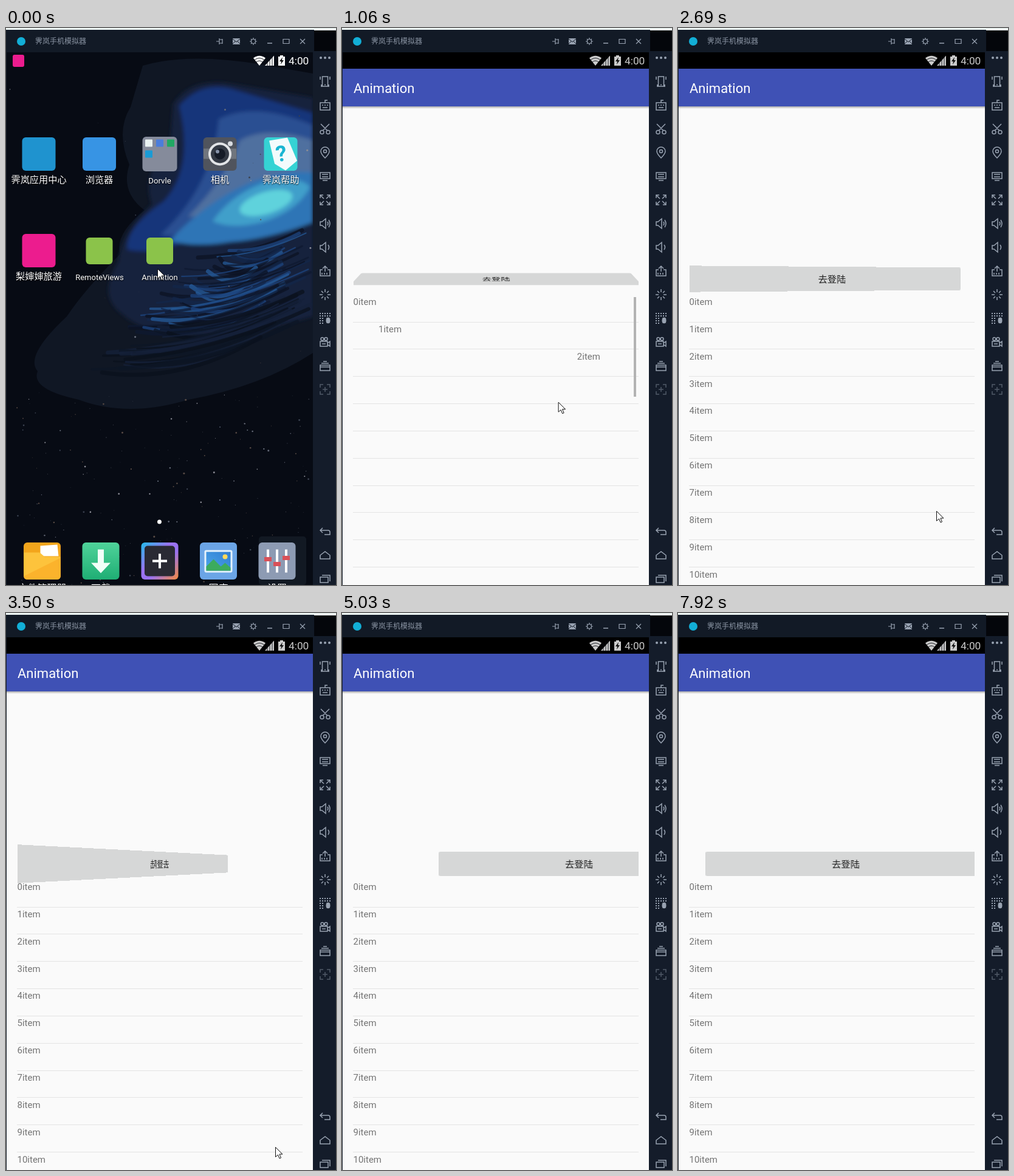
Animation of 543 by 917 pixels, one loop 8000 ms. Source, as an HTML page:

```html
<!DOCTYPE html>
<html lang="zh">
<head>
<meta charset="utf-8">
<title>Animation</title>
<style>
html, body { margin: 0; width: 100%; height: 100%; overflow: hidden; background: #070b14; }
#stage { position: relative; width: 543px; height: 917px; overflow: hidden; }
svg, #app, #content { position: absolute; left: 0; top: 0; width: 543px; height: 917px; overflow: visible; }
text { font-family: Roboto, "Noto Sans CJK SC", "Noto Sans CJK", sans-serif; }
#app { transform-origin: 253px 478px; }
#clip { position: absolute; left: 18.5px; top: 129px; width: 469px; height: 788px; overflow: hidden; }
#button {
  position: absolute; left: 4px; top: 264px; width: 461px; height: 40px;
  border-radius: 2px; background: #d6d7d7; color: #1c1c1c; text-align: center;
  font: 15.3px/39px "Noto Sans CJK SC", "Noto Sans CJK", sans-serif;
}
.label { fill: #fff; text-anchor: middle; text-shadow: 0 1px 2px #000; }
.line { fill: none; stroke: #98a2b1; stroke-width: 1.5; }
</style>
</head>
<body>
<div id="stage">
  <svg viewBox="0 0 543 917">
    <defs>
      <filter id="soft" x="-20%" y="-20%" width="140%" height="140%"><feGaussianBlur stdDeviation="3"/></filter>
      <linearGradient id="sky" x1="0" y1="1" x2="1" y2="0">
        <stop offset="0" stop-color="#4da5ea"/><stop offset="1" stop-color="#2f7fd3"/>
      </linearGradient>
      <linearGradient id="mint" x2="0" y2="1">
        <stop offset="0" stop-color="#4fd39a"/><stop offset="1" stop-color="#1fae74"/>
      </linearGradient>
      <linearGradient id="rainbow" x2="1" y2="1">
        <stop offset="0" stop-color="#21bdea"/><stop offset=".4" stop-color="#9a72f0"/>
        <stop offset=".6" stop-color="#9a72f0"/><stop offset="1" stop-color="#f58a3c"/>
      </linearGradient>
    </defs>
    <rect width="543" height="917" fill="#070b14"/>
    <path fill="#101724" d="M225 62Q300 40 420 60L505 75V535Q420 590 300 612Q200 642 120 612Q40 595 52 565Q30 540 100 475Q130 430 188 372Q178 340 228 300Q188 270 203 225Q180 170 205 130Z"/>
    <g filter="url(#soft)">
      <path fill="#13203c" d="M275 125Q300 85 360 90L505 115V475Q420 500 330 505Q230 508 190 470Q150 440 185 385Q190 335 240 290Q222 240 270 190Z"/>
      <path fill="#18347a" d="M285 128Q320 88 370 100L505 140V270L370 300Q280 380 200 365Q195 330 260 285Q310 230 285 128Z"/>
      <path fill="#2a4f92" d="M350 150Q410 120 505 160V250Q400 250 350 300Q290 350 255 340Q340 260 350 150Z"/>
      <path fill="#506f9f" d="M385 185Q430 160 505 185V245Q420 235 360 282Q320 315 300 310Q360 250 385 185Z"/>
      <path fill="#2f74b6" d="M270 350Q330 285 400 255Q460 232 505 238V320Q430 348 370 352Q310 362 270 350Z"/>
      <path fill="#419fca" d="M340 318Q375 268 440 250Q490 246 500 262Q480 302 420 320Q370 332 340 318Z"/>
      <ellipse cx="428" cy="288" rx="45" ry="18" fill="#5fd2dc" transform="rotate(-17 428 288)"/>
    </g>
    <g id="streaks" fill="none" stroke-linecap="round"></g>
    <g id="stars"></g>
    <rect x="416" y="837" width="78" height="80" rx="5" fill="#121923"/>
    <g id="home"></g>
  </svg>

  <div id="app">
    <svg viewBox="0 0 543 917"><rect x="1" y="67" width="504" height="950" fill="#fafafa"/></svg>
    <div id="content">
      <div id="clip"><div id="button">去登陆</div></div>
      <svg viewBox="0 0 543 917">
        <defs>
          <clipPath id="listClip"><rect x="18" y="434" width="470" height="483"/></clipPath>
          <linearGradient id="shade" x2="0" y2="1">
            <stop offset="0" stop-color="#000" stop-opacity=".32"/><stop offset="1" stop-color="#000" stop-opacity="0"/>
          </linearGradient>
        </defs>
        <rect x="1" y="129" width="504" height="4" fill="url(#shade)"/>
        <rect x="1" y="67" width="504" height="62" fill="#3f51b5"/>
        <text x="19" y="106.5" font-size="22" fill="#fff">Animation</text>
        <path id="speck" d="M18 172l3 3 5-1-5 5-2 4v-6z" fill="#dedede"/>
        <g id="list" clip-path="url(#listClip)"></g>
        <rect id="bar" x="480" y="443" width="4" height="164" fill="#b3b3b3"/>
      </svg>
    </div>
  </div>

  <svg viewBox="0 0 543 917">
    <rect id="statusBg" x="1" y="40" width="504" height="27" fill="#000"/>
    <rect id="badge" x="11" y="44" width="19" height="20" rx="3" fill="#ec1c8e"/>
    <g id="status">
      <path d="M417 62L407 49.500Q417 42 427 49.500ZM441 45.500V62H426Z"/>
      <path d="M448 47h3v-2h5v2h3v15h-11z"/>
      <path d="M455 48l-5 7h3l-1 5 5-7h-3z" fill="#111"/>
      <path d="M409 52.500Q417 46.500 425 52.500M412 56Q417 52 422 56M430 50V62M434 47V62M438 45V62" fill="none" stroke="#0a0d14" stroke-width=".9"/>
      <text x="465" y="60" font-size="17.300">4:00</text>
    </g>
    <rect width="543" height="4" fill="#edf5f3"/>
    <rect x="507" y="4" width="36" height="35" fill="#04060b"/>
    <rect y="3" width="507" height="37" fill="#121a26"/>
    <rect y="40" width="1" height="877" fill="#121a26"/>
    <rect x="505" y="38" width="38" height="879" fill="#141c2a"/>
    <circle cx="25" cy="22" r="7" fill="#12aed6"/>
    <text x="48" y="26" font-size="12" fill="#8b95a4">霁岚手机模拟器</text>
    <g id="chrome" class="line"></g>
    <path id="cursor" d="M0 0V16L4 12.500 6.500 18.500 9 17.500 6.500 11.500H11.500Z" fill="#fff" stroke="#111"/>
  </svg>
</div>

<script>
const $ = id => document.getElementById(id);
const LOOP = 8000, ROWS = 11;
const steps = [0, 430, 550, 700, 820, 950, 1080, 1210, 1330, 1480, 1600, 1720, 1870, 2000, 2140, 2270, 2420,
  2550, 2700, 2820, 2950, 3080, 3220, 3350, 3500, 3650, 3780, 3930, 4060, 4210, 4340, 4480, 4610,
  4760, 4890, 5030, 5160, 5300, 5440, 5590, 5720, 5840, 5990, 6140,
  6540, 6690, 6820, 6950, 7080, 7220, 7350, 7500, 7650, 7790, 7920];
const cursorPath = [[430, 249, 396], [550, 324, 557], [1600, 407, 711], [3500, 443, 879], [3930, 450, 920]];

const clamp = v => Math.max(0, Math.min(1, v));
const ease = v => (1 - Math.cos(Math.PI * clamp(v))) / 2;
const range = (t, start, length) => clamp((t - start) / length);

// Night sky: brushed bands below the bright cloud, then stars
let seed = 17;
const random = () => (seed = seed * 16807 % 2147483647) / 2147483647;
const bands = ['#0b1223', '#1c4580', '#12264a', '#245a98', '#0e1930'];
const dim = ['#0a101c', '#14213a', '#0d1626'];
let brush = '';
for (let i = 0; i < 70; i++) {
  const k = i / 70, y = 325 + 145 * k + random() * 10;
  const left = 290 - 170 * k + random() * 110, right = 400 + random() * 103;
  const drop = (505 - left) * .28, colors = k < .65 ? bands : dim;
  const endY = y + (505 - right) * .45;
  brush += `<path d="M${right} ${endY}Q${(left + right) / 2} ${endY + drop * .8} ${left} ${y + drop}"
    stroke="${colors[i % colors.length]}" stroke-width="${2 + random() * 6}" opacity=".75"/>`;
}
$('streaks').innerHTML = brush;

const tints = ['#3b4250', '#656b78', '#574a45', '#8b8c95'];
let dots = '';
for (let i = 0; i < 220; i++) {
  const x = 3 + random() * 500, y = i < 25 ? 60 + random() * 500 : 917 - random() ** 1.2 * 320;
  dots += `<circle cx="${x.toFixed(1)}" cy="${y.toFixed(1)}" r="${(.4 + random() ** 3 * 1.2).toFixed(2)}" fill="${tints[i % 4]}"/>`;
}
$('stars').innerHTML = dots;

// Home screen
const tile = (x, y, size, fill, inner = '') => `<g transform="translate(${x} ${y})">
  <rect x="${-size / 2}" y="${-size / 2}" width="${size}" height="${size}" rx="6" fill="${fill}"/>${inner}</g>`;
const label = (x, y, words, size = 15.2) => `<text class="label" x="${x}" y="${y}" font-size="${size}">${words}</text>`;
const chip = (x, y, fill) => `<rect x="${x - 6}" y="${y - 6}" width="12" height="12" rx="1" fill="${fill}"/>`;

const camera = `<path d="M-27-9H27V8H-27Z" fill="#70757d"/><circle r="19" fill="#e2e4e7"/>
  <circle r="15" fill="#343a45"/><circle r="9" fill="#151b27"/><circle cx="-4" cy="-4" r="3" fill="#8793aa"/>
  <circle cx="17" cy="-17" r="4" fill="#d8dbe0"/>`;
const help = `<path d="M-19-22L11-27 27 11 8 27-10 16Z" fill="#f3fbfc"/>
  <text x="1" y="12" font-size="36" font-weight="700" fill="#19b5d2" text-anchor="middle" transform="rotate(-8)">?</text>`;
const folder = `<path d="M-3-25L25-27 27-8H-3Z" fill="#fff"/>
  <path d="M-30-14H-4L4-7H30V25Q30 30 25 30H-25Q-30 30-30 25Z" fill="#fdc33c"/>
  <path d="M-30 25L30-5V25Q30 30 25 30H-25Q-30 30-30 25Z" fill="#fbb32c"/>`;
const down = `<path d="M-5-19H5V3H16L0 20-16 3H-5Z" fill="#f2fff8"/>`;
const plus = `<rect x="-25" y="-25" width="50" height="50" rx="5" fill="#2a2a34"/>
  <path d="M-12 0H12M0-12V12" stroke="#fff" stroke-width="4"/>`;
const gallery = `<rect x="-23" y="-18" width="46" height="37" rx="3" fill="#e5f2fb"/>
  <rect x="-20" y="-15" width="40" height="31" fill="url(#sky)"/>
  <path d="M-20 16V9L-8-3 4 9 11 3 20 11V16Z" fill="#3cab5e"/><circle cx="11" cy="-7" r="4" fill="#ffd95a"/>`;
const sliders = `<path d="M-15-19V19M0-19V19M15-19V19" stroke="#fff" stroke-width="4"/>
  <path d="M-21-3H-9M-6 5H6M9-5H21" stroke="#d95058" stroke-width="7"/>`;

$('home').innerHTML =
  tile(54, 207.5, 55, '#1f93cf') + label(54, 255, '霁岚应用中心') +
  tile(153.5, 207.5, 55, '#3794e4') + label(153.5, 255, '浏览器') +
  tile(253, 207.5, 57, '#858b9b', chip(-18, -18, '#e9f2f2') + chip(0, -18, '#4b7ddb') +
    chip(18, -18, '#20a863') + chip(-18, 0, '#1a9bd5')) + label(253, 255.5, 'Dorvle', 13.2) +
  tile(352, 207.5, 55, '#50545d', camera) + label(352, 255, '相机') +
  tile(452, 207.5, 55, '#35d3d4', help) + label(452, 255, '霁岚帮助') +
  tile(54, 366.5, 55, '#ec1c8e') + label(54, 414, '梨婶婶旅游') +
  tile(153.5, 367, 44, '#8bc34a') + label(154, 414.5, 'RemoteViews', 13) +
  tile(253, 367, 44, '#8bc34a') + label(253, 414.5, 'Animation', 13) +
  '<circle cx="252.500" cy="813" r="3.500" fill="#fff"/>' +
  tile(59.5, 877.5, 61, '#f3a51c', folder) + label(59.5, 928, '文件管理器', 16) +
  tile(156, 877.5, 61, 'url(#mint)', down) + label(156, 928, '下载', 16) +
  tile(253, 877.5, 61, 'url(#rainbow)', plus) +
  tile(349.5, 877.5, 61, '#6ba5e6', gallery) + label(349.5, 928, '图库', 16) +
  tile(446, 877.5, 61, '#8d9bb3', sliders) + label(446, 928, '设置', 16);

// Window and side bar icons, each drawn around its own centre
const glyph = (x, y, d, extra = '') => `<path transform="translate(${x} ${y})" d="${d}" ${extra}/>`;
const thin = 'stroke-width="1.2"', solid = 'fill="#98a2b1" stroke="#121a26" stroke-width="1"';
const corners = 'M-8-3V-8H-3M3-8H8V-3M8 3V8H3M-3 8H-8V3';
const speaker = 'M-8-3H-5L1-8V8L-5 3H-8Z';
const side = [
  [88, 'M-4.500-8H4.500V8H-4.500ZM-1 5.500H1M-8-8V-3M8-8V-3M-6 5V9M6 5V9'],
  [127, 'M-8-4H8V8H-8ZM0-4V-8H4M-5 0H-3M-1 0H1M3 0H5M-4 4H4'],
  [166, 'M-7-8L4 3M7-8L-4 3M-8 5.500a3 3 0 1 0 6 0a3 3 0 1 0-6 0M2 5.500a3 3 0 1 0 6 0a3 3 0 1 0-6 0'],
  [205, 'M0 9Q-7 2-7-2A7 7 0 0 1 7-2Q7 2 0 9ZM-2.500-2a2.500 2.500 0 1 0 5 0a2.500 2.500 0 1 0-5 0'],
  [244, 'M-8-6H8V4H-8ZM-5-3H5M-5 1H5M-4 7H4'],
  [283, corners + 'M-7-7L-2-2M7-7L2-2M7 7L2 2M-7 7L-2 2'],
  [322, speaker + 'M4-3Q6 0 4 3M6-6Q10 0 6 6'],
  [361, speaker + 'M5-4Q8 0 5 4'],
  [400, 'M-4-2H-8V8H8V-2H4M0 1V-8M-4-4L0-8 4-4M-5 3V6M-1 3V6M3 3V6'],
  [439, 'M0-9V-4M0 9V4M-9 0H-4M9 0H4M-6-6L-3-3M6 6L3 3M-6 6L-3 3M6-6L3-3'],
  [517, 'M-8-1H4V7H-8ZM4 2L8-1V7L4 4M-7-5a2.500 2.500 0 1 0 5 0a2.500 2.500 0 1 0-5 0M-1-5a2.500 2.500 0 1 0 5 0a2.500 2.500 0 1 0-5 0M-5 3H1'],
  [556, 'M-8-1H8V8H-8ZM-6-4H6M-3-7H3M-8 2H8'],
  [829, 'M-4-6L-8-2-4 2M-8-2H5Q8-2 8 1V5H-1'],
  [868, 'M-8 0L0-6 8 0V6H-8Z'],
  [907, 'M-8-3H5V6H-8ZM-5-6H8V4']
];
$('chrome').innerHTML =
  glyph(525, 49, 'M-7 0h.01M0 0h.01M7 0h.01', 'stroke-width="4" stroke-linecap="round"') +
  side.map(([y, d]) => glyph(525, y, d)).join('') +
  glyph(525, 478, 'M-9-8H9M-9-4H9M-9 0H-2M-9 4H-2M-9 8H-2', 'stroke-width="2" stroke-dasharray="2"') +
  glyph(530, 481, 'M-4 0Q-4-5 0-5T4 0V2Q4 6 0 6T-4 2Z', solid) +
  glyph(525, 595, corners + 'M-4 0H4M0-4V4', 'stroke="#505968"') +
  glyph(352, 22, 'M-6 0H-1M-1-5V5M-1-3H4V3H-1M4-4V4', thin) +
  glyph(379, 22, 'M-6-5H6V5H-6Z', 'fill="#98a2b1" stroke="none"') +
  glyph(379, 22, 'M-6-4L0 1 6-4M-6 4L-2 0M6 4L2 0', 'stroke="#121a26" stroke-width="1"') +
  glyph(407, 22, 'M-3.500 0a3.500 3.500 0 1 0 7 0a3.500 3.500 0 1 0-7 0M0-6V-4M0 6V4M-6 0H-4M6 0H4M-4-4L-3-3M4 4L3 3M-4 4L-3 3M4-4L3-3', thin) +
  glyph(434, 25, 'M-4 0H4') + glyph(461, 22, 'M-5-3.500H5V3.500H-5Z', thin) +
  glyph(488, 22, 'M-4-4L4 4M4-4L-4 4', thin);

// List rows
let rows = '';
for (let i = 0; i < ROWS; i++) {
  rows += `<rect x="18" y="${Math.floor(484 + 44.85 * i)}" width="470" height="1" fill="#e4e4e4"/>
    <text class="row" x="18.500" y="${456 + 44.85 * i}" font-size="15" fill="#747474">${i}item</text>`;
}
$('list').innerHTML = rows;
const items = document.querySelectorAll('.row');

function moveCursor(t) {
  let i = 0;
  while (i < cursorPath.length - 2 && t > cursorPath[i + 1][0]) i++;
  const [t0, x0, y0] = cursorPath[i], [t1, x1, y1] = cursorPath[i + 1];
  const k = range(t, t0, t1 - t0);
  $('cursor').setAttribute('transform', `translate(${x0 + (x1 - x0) * k + .5} ${y0 + (y1 - y0) * k + .5})`);
}

function draw(time) {
  const t = steps.findLast(s => s <= time);
  const open = t >= 430, settled = t >= 700;

  $('app').style.visibility = open ? 'visible' : 'hidden';
  $('app').style.opacity = t === 430 ? .8 : 1;
  $('app').style.transform = settled ? 'none' : `scale(${t < 550 ? .93 : .992})`;
  $('content').style.opacity = settled ? 1 : t < 550 ? .2 : .51;
  $('statusBg').style.display = open ? '' : 'none';
  $('badge').style.display = open ? 'none' : '';
  $('status').setAttribute('fill', open ? '#cbcbcb' : '#fff');

  const turnX = 360 * ease(range(t, 430, 1930));
  const turnY = 360 * ease(range(t, 2357, 1953));
  const shift = 470 * ease(1 - Math.abs(t - 6261) / 1930);
  $('button').style.transform =
    `translateX(${shift}px) perspective(435px) rotateX(${turnX}deg) rotateY(${turnY}deg)`;

  items.forEach((item, i) => {
    const x = 470 * (1 - ease(range(t, 623 + 125 * i, 250)));
    item.setAttribute('transform', `translate(${x} 0)`);
  });
  $('bar').setAttribute('opacity', 1 - range(t, 1700, 250));
  $('speck').style.display = t >= 1480 && t < 1720 ? '' : 'none';
  moveCursor(t);
}

function tick() {
  draw(performance.now() % LOOP);
  requestAnimationFrame(tick);
}
tick();
</script>
</body>
</html>
```
